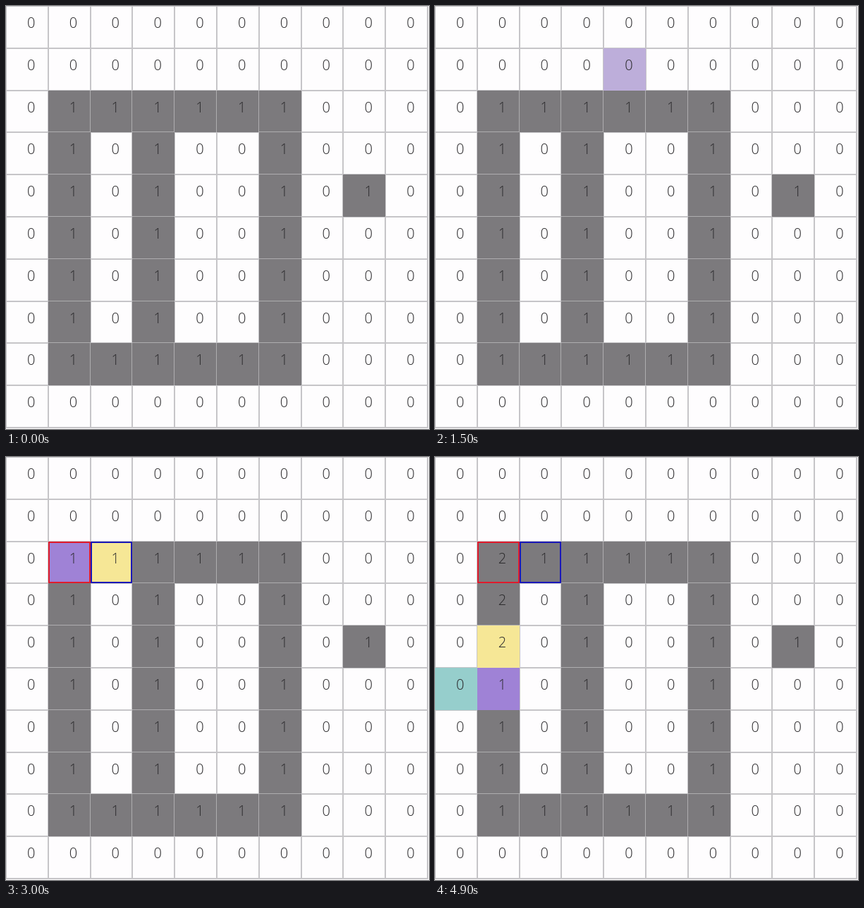
An HTML page with a canvas that plays this animation: 600 px wide and 600 px high, repeating every 5000 ms.

```html
<!DOCTYPE html>
<html lang="en">
<head>
<meta charset="utf-8">
<title>Border following</title>
<style>
  html, body { margin: 0; width: 100%; height: 100%; overflow: hidden; background: #fefdfe; }
  canvas { display: block; width: 600px; height: 600px; }
</style>
</head>
<body>
<canvas id="stage" width="600" height="600"></canvas>
<script>
const ctx = document.getElementById('stage').getContext('2d');
const N = 10, PITCH = 59.8, STEP = 100, STEPS = 50;
const COLOR = {
  paper: '#fefdfe', line: '#c6c5c8', ink: '#2b2a2c',
  block: '#7c7a7d', seam: '#aeadaf',
  scan: '#bdaeda', center: '#9f82d6', from: '#f6e796', probe: '#96cecc',
  start: '#e01b2c', first: '#1a18b8'
};

const grid = [
  '0000000000', '0000000000', '0111111000', '0101001000', '0101001010',
  '0101001000', '0101001000', '0101001000', '0111111000', '0000000000'
].map(row => [...row].map(Number));

// Neighbours in clockwise order, beginning on the left.
const RING = [[0, -1], [-1, -1], [-1, 0], [-1, 1], [0, 1], [1, 1], [1, 0], [1, -1]];

const add = (p, d) => [p[0] + d[0], p[1] + d[1]];
const same = (a, b) => a[0] === b[0] && a[1] === b[1];

// Run border following once and record one state per step.
function trace() {
  const states = [{}];
  const marks = [];
  const record = s => states.push({ marked: marks.length, ...s });

  let start;
  for (let i = 0; !start; i++) {
    const p = [Math.floor(i / N), i % N];
    record({ scan: p });
    if (grid[p[0]][p[1]]) start = p;
  }
  record({ scan: start, start });

  let center = start, from = add(start, RING[0]), first;
  const search = (index, turn) => {
    for (;; index += turn) {
      const p = add(center, RING[(index + 8) % 8]);
      record({ center, from, start, first, probe: p });
      if (grid[p[0]][p[1]]) return p;
    }
  };

  record({ center, from, start });
  first = from = search(0, 1);
  record({ center, from, start, first });

  while (states.length < STEPS) {
    const at = RING.findIndex(d => same(add(center, d), from));
    const next = search(at - 1, -1);
    marks.push(center);
    from = center;
    center = next;
    record({ center, from, start, first });
  }
  return { states, marks };
}

const { states, marks } = trace();
const edge = i => Math.round(i * PITCH);

function fillCell([r, c], color) {
  ctx.fillStyle = color;
  ctx.fillRect(edge(c), edge(r), edge(c + 1) - edge(c), edge(r + 1) - edge(r));
}

function outline([r, c], color) {
  ctx.strokeStyle = color;
  ctx.lineWidth = 2;
  ctx.strokeRect(edge(c) + 1, edge(r) + 1, edge(c + 1) - edge(c) - 2, edge(r + 1) - edge(r) - 2);
}

function eachCell(fn) {
  grid.forEach((row, r) => row.forEach((v, c) => fn(r, c, v)));
}

function drawGrid() {
  ctx.fillStyle = COLOR.paper;
  ctx.fillRect(0, 0, 600, 600);
  ctx.fillStyle = COLOR.line;
  for (let i = 0; i <= N; i++) {
    ctx.fillRect(edge(i) - 1, 0, 2, 599);
    ctx.fillRect(0, edge(i) - 1, 599, 2);
  }
  eachCell((r, c, v) => v && fillCell([r, c], COLOR.block));
  ctx.fillStyle = COLOR.seam;
  eachCell((r, c, v) => {
    if (!v) return;
    if (grid[r][c + 1]) ctx.fillRect(edge(c + 1) - 1, edge(r), 1, edge(r + 1) - edge(r));
    if (grid[r + 1][c]) ctx.fillRect(edge(c), edge(r + 1) - 1, edge(c + 1) - edge(c), 1);
  });
}

function drawDigits(marked) {
  const done = marks.slice(0, marked);
  ctx.fillStyle = COLOR.ink;
  ctx.font = '300 20px "Open Sans", "Noto Sans", sans-serif';
  ctx.textAlign = 'left';
  ctx.textBaseline = 'alphabetic';
  eachCell((r, c, v) => {
    const label = done.some(p => same(p, [r, c])) ? 2 : v;
    ctx.fillText(label, 30 + c * PITCH, 31 + r * PITCH);
  });
}

function draw(time) {
  const s = states[Math.floor(time / STEP) % STEPS];
  drawGrid();
  for (const key of ['scan', 'center', 'from', 'probe']) {
    if (s[key]) fillCell(s[key], COLOR[key]);
  }
  for (const key of ['start', 'first']) {
    if (s[key]) outline(s[key], COLOR[key]);
  }
  drawDigits(s.marked || 0);
}

const begin = performance.now();
function tick() {
  draw(performance.now() - begin);
  requestAnimationFrame(tick);
}
tick();
</script>
</body>
</html>
```
